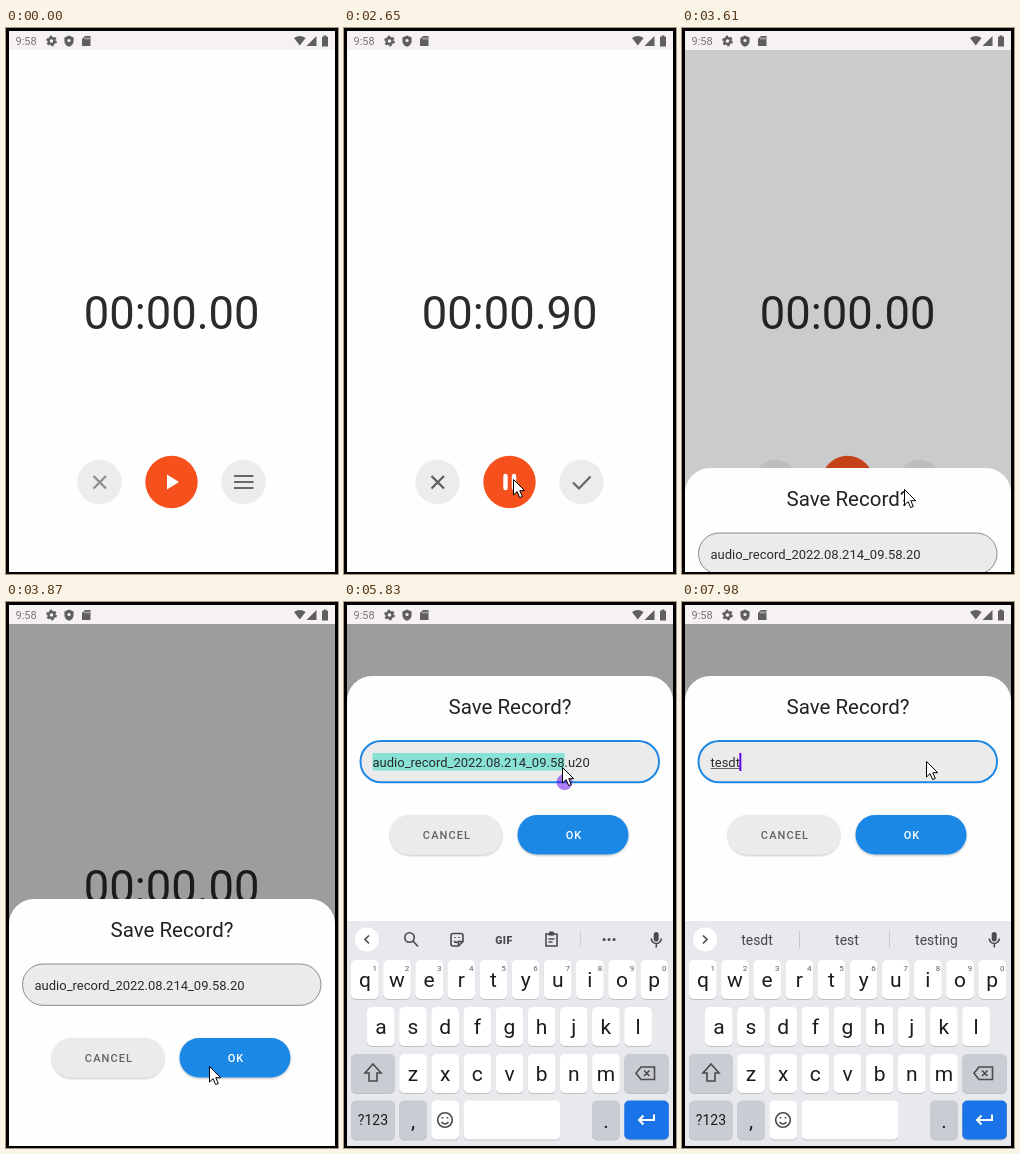
These frames come from a looping animation (332x546 px, 8000 ms). An HTML page:

```html
<!DOCTYPE html>
<html lang="en">
<head>
<meta charset="utf-8">
<title>Audio recorder</title>
<style>
  html, body { margin: 0; width: 100%; height: 100%; overflow: hidden; background: #000; }
  svg { display: block; width: 332px; height: 546px; font-family: Roboto, "Open Sans", sans-serif; }
  .mid { text-anchor: middle; }
  .line { fill: none; stroke: #4a4a4d; stroke-width: 1.6; }
  .btn { font-size: 11px; font-weight: 500; letter-spacing: 1.1px; }
  .key { font-size: 21px; fill: #1c1c1e; }
  .hint { font-size: 8px; fill: #5c5c60; }
  .word { font-size: 14px; fill: #46474a; }
</style>
</head>
<body>
<svg viewBox="0 0 332 546">
  <defs>
    <clipPath id="screen"><rect x="3" y="3" width="326" height="541"/></clipPath>
    <filter id="soft" x="-20%" y="-20%" width="140%" height="150%">
      <feDropShadow dx="0" dy="1" stdDeviation="1" flood-opacity=".28"/>
    </filter>
    <path id="drop" d="M0 0L5.6 4A8 8 0 1 1-5.6 4Z" fill="#6200ee"/>
    <path id="side" d="M0 0h8a8 8 0 1 1-8 8z" fill="#6200ee"/>
  </defs>
  <rect width="332" height="546"/>
  <g clip-path="url(#screen)">
    <rect x="3" y="3" width="326" height="541" fill="#fefefe"/>
    <text id="timer" class="mid" x="165.7" y="300.5" font-size="45.3" fill="#2b2b2b"></text>

    <circle cx="93.5" cy="454" r="22.3" fill="#ececec"/>
    <path id="cross" d="M87.5 448l12.5 12.5m0-12.5l-12.5 12.5" fill="none" stroke-width="2.2"/>
    <circle cx="165.5" cy="454" r="26.2" fill="#f6511d"/>
    <circle id="ripple" cx="166" cy="455" fill="#a98272"/>
    <path id="play" d="M161 446.5v15l12-7.5z" fill="#fff"/>
    <path id="pause" d="M161.5 448v12m8.5-12v12" stroke="#fff" stroke-width="4.4" stroke-linecap="round"/>
    <circle id="right" cx="237.5" cy="454" r="22.3"/>
    <path id="menu" d="M228 448h19.5m-19.5 6h19.5m-19.5 6h19.5" stroke="#686868" stroke-width="2"/>
    <path id="check" d="M229 454.5l6 6 11.5-12" fill="none" stroke="#666" stroke-width="2.2"/>

    <rect id="scrim" x="3" y="22" width="326" height="524"/>

    <g id="dialog">
      <path d="M3 600V26a25 25 0 0 1 25-26H304a25 25 0 0 1 25 26V600z" fill="#fefefe"/>
      <text class="mid" x="166" y="38.3" font-size="20.5" fill="#222">Save Record?</text>
      <rect id="field" x="16.5" y="65" width="298.5" height="41.3" rx="20.6" fill="#ebebeb"/>
      <rect id="mark" x="28.5" y="77" height="17.5" fill="#88e2d5"/>
      <text id="name" x="28.5" y="90.5" font-size="13" fill="#2a2a2a"></text>
      <path id="under" stroke="#666" fill="none"/>
      <rect id="caret" y="77" width="2" height="18" fill="#6200ee"/>
      <use id="grip" href="#drop"/>
      <g id="ends">
        <use href="#side" transform="translate(28.5 97) scale(-1 1)"/>
        <use id="endR" href="#side"/>
      </g>
      <rect x="46" y="139" width="112" height="39.5" rx="19.7" fill="#ebebeb" filter="url(#soft)"/>
      <text class="btn mid" x="103" y="163.3" fill="#626262">CANCEL</text>
      <rect x="173.5" y="139" width="111" height="39.5" rx="19.7" fill="#1e88e5" filter="url(#soft)"/>
      <text class="btn mid" x="230" y="163.3" fill="#fff">OK</text>
      <g id="bar">
        <rect x="36" y="33" width="202" height="41" rx="3" fill="#fff" filter="url(#soft)"/>
        <g font-size="12.5" font-weight="500" fill="#333">
          <text x="50" y="58">Cut</text><text x="100" y="58">Copy</text><text x="158" y="58">Paste</text>
        </g>
        <path d="M222 49v.1m0 4.9v.1m0 4.9v.1" stroke="#555" stroke-width="2.8" stroke-linecap="round"/>
      </g>
    </g>

    <g id="board">
      <rect x="3" y="319" width="326" height="240" fill="#e8e9ed"/>
      <circle cx="23" cy="337.5" r="12" fill="#fff"/>
      <path id="arrow" class="line"/>
      <g id="tools">
        <path class="line" d="M69 339l5 5.5"/><circle class="line" cx="65.500" cy="335.500" r="4.700"/>
        <path class="line" d="M109 331.500h8a2 2 0 0 1 2 2v6l-4.500 4.500h-5.500a2 2 0 0 1-2-2v-8.500a2 2 0 0 1 2-2zM119 339.500h-4.500v4.500M110 339q2 2.500 4 .5"/>
        <path d="M111 335v1m4-1v1" stroke="#4a4a4d" stroke-width="1.500"/>
        <text class="mid" x="160" y="341.500" font-size="10.500" font-weight="800" letter-spacing=".5" fill="#4a4a4d">GIF</text>
        <path class="line" d="M202 332h11v12h-11zM204.500 332.500h6M204.500 337h6m-6 3h4"/>
        <rect x="205" y="329.500" width="5" height="4" rx="1" fill="#4a4a4d"/>
        <path d="M236.500 329v17" stroke="#cfd1d5"/>
        <path d="M260 337.500h.1m4.900 0h.1m4.900 0h.1" stroke="#4a4a4d" stroke-width="3" stroke-linecap="round"/>
      </g>
      <g id="words">
        <text class="word mid" x="75" y="342.500"></text>
        <text class="word mid" x="165" y="342.500"></text>
        <text class="word mid" x="254.500" y="342.500"></text>
        <path d="M117.500 329v17m90-17v17" stroke="#c6c8cc"/>
      </g>
      <rect x="309.700" y="330" width="5" height="9.500" rx="2.500" fill="#4a4a4d"/>
      <path class="line" d="M307.300 336.500a5 5 0 0 0 10 0M312.300 341.500v4"/>
      <g id="keys"></g>
      <path class="line" d="M29 462l8 9h-4v8h-8v-8h-4z"/>
      <path class="line" d="M297 465h13.500v12.500h-13.500l-5-6.200zM300 468.500l5.500 5.500m0-5.500l-5.500 5.500"/>
      <circle class="line" cx="101" cy="518" r="7.300"/>
      <path class="line" d="M97.500 520q3.500 4 7 0M98.500 515v1.500m5-1.500v1.500"/>
      <path class="line" style="stroke:#fff;stroke-width:2" d="M310 512.500v5.500h-15m4.500-4.500l-4.500 4.500 4.500 4.500"/>
    </g>

    <rect x="3" y="3" width="326" height="19" fill="#f5f1f5"/>
    <text x="9.500" y="17" font-size="11" fill="#777">9:58</text>
    <g fill="#5f5f61">
      <g fill="none" stroke="#5f5f61">
        <circle cx="45.500" cy="13" r="3" stroke-width="2.400"/>
        <circle cx="45.500" cy="13" r="4.600" stroke-width="1.600" stroke-dasharray="2.400 2.420"/>
      </g>
      <path d="M63 7.500l4.600 2v3.500c0 3-2 4.800-4.600 5.800c-2.600-1-4.600-2.800-4.600-5.800v-3.500z"/>
      <circle cx="63" cy="12.500" r="1.600" fill="#f5f1f5"/>
      <path d="M79 8h5.500v10h-8.500v-7z"/>
      <path d="M79 9.500v2m2-2v2m2-2v2" stroke="#f5f1f5" stroke-width=".8"/>
      <path d="M288 10q5.800-4 11.600 0l-5.800 7.600z"/>
      <path d="M310.500 8v10h-10z"/>
      <path d="M317.500 7.500h3v1.300h1.500v9.700h-6v-9.700h1.500z"/>
    </g>
  </g>
  <path id="cursor" d="M.5 .5V16l3.600-3.400 2.500 6 2.700-1.100-2.500-5.800h4.900z" fill="#fff" stroke="#000" stroke-linejoin="round"/>
</svg>
<script>
const LOOP = 8000;
const $ = id => document.getElementById(id);
const set = (id, attrs) => { for (const k in attrs) $(id).setAttribute(k, attrs[k]); };
const show = (id, on) => { $(id).style.display = on ? "" : "none"; };

// Screen refresh times; everything holds still between them.
const ticks = [0, 150, 280, 430, 550, 670, 1690, 1810, 1960, 2120, 2260, 2380, 2500, 2650,
  2800, 2920, 3070, 3190, 3340, 3480, 3610, 3730, 3870, 3990, 4110, 4230, 4380, 4500, 4620,
  4740, 4860, 5010, 5130, 5250, 5370, 5520, 5680, 5830, 5950, 6100, 6230, 6370, 6500, 6640,
  6760, 7040, 7160, 7310, 7430, 7580, 7710, 7830, 7980];

const pointer = [[150, 171, 530], [280, 168, 514], [430, 169, 485], [670, 169, 451],
  [2650, 169, 451], [2920, 173, 451], [3070, 206, 454], [3190, 231, 459], [3480, 231, 459],
  [3870, 203, 464], [3990, 207, 450], [4110, 221, 402], [4230, 223, 384], [4860, 223, 384],
  [5250, 221, 200], [5370, 219, 166], [5520, 220, 167], [5680, 218, 165], [5830, 218, 165],
  [6100, 221, 165], [6500, 222, 166], [6760, 244, 159]];
const dialogY = [[3480, 546], [3610, 440], [3730, 330], [3870, 297], [4230, 297], [4380, 74]];
const dim = [[3480, 0], [3610, .2], [3870, .385]];
const boardY = [[4380, 227], [4500, 190], [4620, 111], [4740, 35], [4860, 0]];
const boardFade = [[4380, 0], [4620, .6], [4860, 1]];
const barFade = [[6230, 0], [6500, 1], [7160, 1], [7430, 0]];

const base = "audio_record_2022.08.214_09.58";
const names = [[0, base + ".20"], [5830, base + ".u20"], [7040, "t"], [7310, "te"],
  [7430, "tes"], [7580, "tesd"], [7830, "tesdt"]];
const hints = [[7040, "t", "the", "to"], [7310, "te", "test", "tell"], [7430, "tes", "test", "testing"],
  [7710, "tesd", "test", "testing"], [7980, "tesdt", "test", "testing"]];

const last = (rows, t) => rows.filter(r => r[0] <= t).pop();

function mix(rows, t) {
  const i = rows.findIndex(r => r[0] > t);
  if (i < 0) return rows[rows.length - 1].slice(1);
  if (!i) return rows[0].slice(1);
  const a = rows[i - 1], b = rows[i], p = (t - a[0]) / (b[0] - a[0]);
  return a.slice(1).map((v, j) => v + (b[j + 1] - v) * p);
}

function key(x, y, w, fill, label = "", hint = "") {
  const small = label.length > 1;
  return `<rect x="${x}" y="${y + 1}" width="${w}" height="39" rx="5" fill="#bfc1c6"/>
    <rect x="${x}" y="${y}" width="${w}" height="39" rx="5" fill="${fill}"/>
    <text class="key mid" x="${x + w / 2}" y="${y + (small ? 24.5 : 27)}"
      ${small ? 'style="font-size:14px"' : ""}>${label}</text>
    <text class="hint mid" x="${x + w / 2 + 10}" y="${y + 11}">${hint}</text>`;
}

function keyboard() {
  const step = 32.15, w = 27.7, grey = "#c9ccd3";
  const row = (letters, x, y, digits = "") =>
    [...letters].map((c, i) => key(x + i * step, y, w, "#fff", c, digits[i])).join("");
  return row("qwertyuiop", 7, 358, "1234567890") + row("asdfghjkl", 23, 405) +
    key(7, 452, 43.8, grey) + row("zxcvbnm", 55.2, 452) + key(280.3, 452, 44.5, grey) +
    key(7, 498.5, 43.8, grey, "?123") + key(55.2, 498.5, w, grey, ",") +
    key(87.3, 498.5, w, "#fff") + key(119.5, 498.5, 97, "#fff") +
    key(248.1, 498.5, w, grey, ".") + key(280.3, 498.5, 44.5, "#1a73e8");
}

function home(t) {
  const rec = t >= 1810 && t < 3610;
  const tenths = rec ? Math.floor((t - 1705) / 100) : 0;
  $("timer").textContent = `00:0${Math.floor(tenths / 10)}.${tenths % 10}0`;
  set("cross", { stroke: rec ? "#5e5e5e" : "#8c8c8c" });
  const press = t >= 1690 && t < 1960;
  set("ripple", { r: t < 1810 ? 18.5 : 26.2, opacity: press ? (t < 1810 ? .55 : .35) : 0 });
  show("play", !rec);
  show("pause", rec);
  show("menu", !rec);
  show("check", rec);
  set("right", { fill: t >= 3480 && t < 3610 ? "#b9b9b9" : "#ececec" });
}

function dialog(t) {
  const focus = t >= 4230, typing = t >= 7040;
  show("dialog", t >= 3610);
  set("dialog", { transform: `translate(0 ${mix(dialogY, t)})` });
  set("scrim", { opacity: mix(dim, t) });
  set("field", { stroke: focus ? "#1e88e5" : "#8a8a8a", "stroke-width": focus ? 2 : 1 });

  const text = last(names, t)[1], el = $("name");
  el.textContent = text;
  const xAt = n => 28.5 + (n ? el.getSubStringLength(0, n) : 0);
  const end = xAt(text.length);

  const part = t >= 5830 && t < 5950, all = t >= 6100 && !typing;
  set("mark", { width: part ? xAt(base.length) - 28.5 : all ? end - 28.5 : 0 });
  set("under", { d: typing ? `M28.500 92.500H${xAt(last(hints, t)[1].length)}` : "" });

  const spot = typing ? end : xAt(base.length + (t < 5680 ? 1 : 0));
  show("caret", t >= 4380 && !part && !all);
  set("caret", { x: spot - .6 });
  show("grip", t >= 4380 && t < 5950);
  set("grip", { transform: `translate(${spot} 96.500)`, opacity: part ? .5 : 1 });
  show("ends", t >= 6370 && !typing);
  set("endR", { transform: `translate(${end} 97)` });
  set("bar", { opacity: mix(barFade, t) });
}

function board(t) {
  const typing = t >= 7040;
  show("board", t >= 4500);
  set("board", { transform: `translate(0 ${mix(boardY, t)})`, opacity: mix(boardFade, t) });
  show("tools", !typing);
  show("words", typing);
  set("arrow", { d: typing ? "M21 333.500l4 4-4 4" : "M25 333.500l-4 4 4 4" });
  if (typing) {
    const row = last(hints, t);
    $("words").querySelectorAll("text").forEach((el, i) => { el.textContent = row[i + 1]; });
  }
}

function draw(t) {
  home(t);
  dialog(t);
  board(t);
  const [x, y] = mix(pointer, t).map(Math.round);
  show("cursor", t >= 150);
  set("cursor", { transform: `translate(${x} ${y})` });
}

$("keys").innerHTML = keyboard();
const start = performance.now();
let shown = -1;
function frame() {
  const now = (performance.now() - start) % LOOP;
  const t = ticks.filter(v => v <= now).pop();
  if (t !== shown) draw(shown = t);
  requestAnimationFrame(frame);
}
frame();
</script>
</body>
</html>
```
